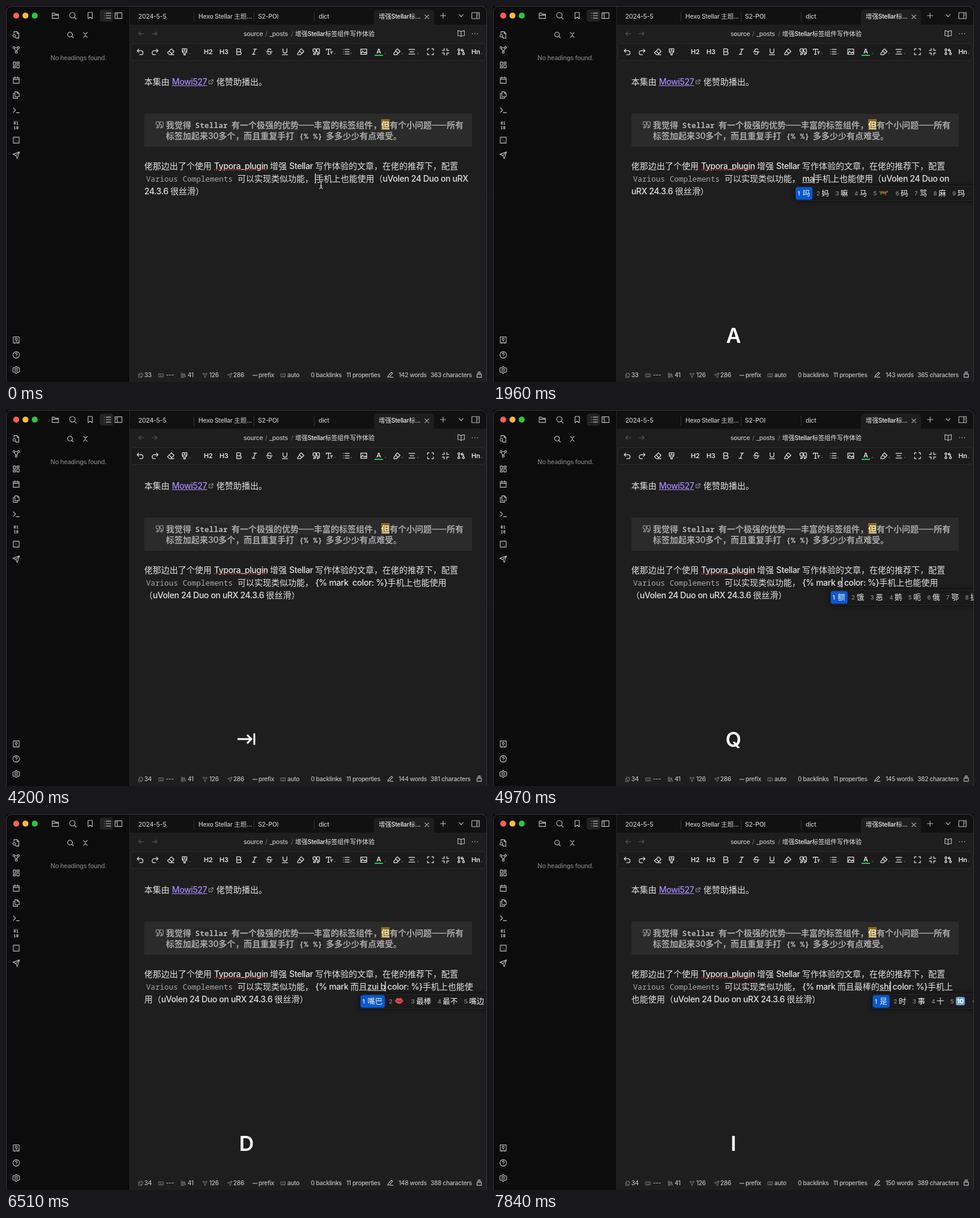
An HTML page with a canvas that plays this animation: 800 px wide and 625 px high, repeating every 8000 ms.

```html
<!DOCTYPE html>
<html lang="zh">
<head>
<meta charset="utf-8">
<style>
html, body { margin: 0; width: 100%; height: 100%; overflow: hidden; background: #0c0c0c; }
canvas { display: block; }
</style>
</head>
<body>
<canvas id="stage" width="800" height="625"></canvas>
<script>
const ctx = document.getElementById('stage').getContext('2d');
const LOOP = 8000, STEP = 70, BLINK = 455;
const LATIN = 'Inter, sans-serif', CJK = '"Noto Sans CJK SC", "Noto Sans CJK", sans-serif', MONO = '"Noto Sans Mono", monospace';
const TAIL = '手机上也能使用（uVolen 24 Duo on uRX 24.3.6 很丝滑）';
const OPEN = '{% mark ', CLOSE = ' color: %}';

// Each key press: overlay at `at`, text one step later; `cut` = tail characters left on the line.
const press = (at, key, before, comp, cut, cands, after = '') =>
  ({ at, key, before, comp, cut, cands: cands ? cands.split(' ') : null, after });
const tag = (at, key, text, comp, cut, cands) => press(at, key, OPEN + text, comp, cut, cands, CLOSE);
const ROWS = [
  press(-105, '', '', '', 29),
  press(1050, 'M', '', 'm', 29, '没 吗 们 每 买 名 么 面 美'),
  press(1540, 'A', '', 'ma', 25, '吗 妈 嘛 马 🐎 码 骂 麻 玛'),
  press(2030, 'R', '', 'ma r', 25, '骂人 买入 蚂蚁 马人 马儿 麻人'),
  press(2450, 'K', '', 'ma r k', 25, 'mark 骂人 买入 马儿 麻人'),
  press(3010, 'space', 'mark', '', 25),
  tag(3430, 'tab', '', '', 7),
  tag(4550, 'E', '', 'e', 7, '额 饿 恶 鹅 呃 俄 鄂 扼 峨'),
  tag(4970, 'Q', '', 'e q', 7, '而且 二期 恶气 二七 额前'),
  tag(5530, 'space', '而且', '', 7),
  tag(5740, 'Z', '而且', 'z', 7, '在 做 再 这 最 总 走 字 怎'),
  tag(5950, 'V', '而且', 'zui', 6, '最 嘴 罪 醉 👄 堆 咀 蕞'),
  tag(6230, 'B', '而且', 'zui b', 6, '嘴巴 👄 最棒 最不 嘴边 最笨'),
  tag(6510, 'D', '而且', 'zui b d', 5, '最棒的 最不对 最大 嘴巴的'),
  tag(6860, 'space', '而且最棒的', '', 5),
  tag(7350, 'U', '而且最棒的', 'sh', 4, '是 上 说 时 事 使 十 谁 水'),
  tag(7700, 'I', '而且最棒的', 'shi', 3, '是 时 事 十 🔟 使 式 市')
];

const ICONS = {
  folder: 'M3 5h6l3 3h9v12H3zM3 11h18',
  search: 'M11 3a8 8 0 1 0 .01 0zM17 17l5 5',
  bookmark: 'M6 3h12v18l-6-5-6 5z',
  list: 'M3 5h.1M3 12h.1M3 19h.1M8 5h13M8 12h13M8 19h13',
  panel: 'M2 4h20v16H2zM9 4v16M5 8h1M5 12h1',
  panelRight: 'M2 4h20v16H2zM15 4v16M18 8h1M18 12h1',
  close: 'M5 5l14 14M19 5L5 19',
  plus: 'M12 3v18M3 12h18',
  chevron: 'M5 8l7 8 7-8',
  back: 'M21 12H3m7-7-7 7 7 7',
  forward: 'M3 12h18m-7-7 7 7-7 7',
  book: 'M12 6v15M12 6c-2-2-6-3-10-3v15c4 0 8 0 10 3 2-3 6-3 10-3V3c-4 0-8 1-10 3z',
  dots: 'M4 12h.1M12 12h.1M20 12h.1',
  undo: 'M8 14L3 9l5-5M3 9h12a6 6 0 0 1 0 12h-4',
  redo: 'M16 14l5-5-5-5M21 9H9a6 6 0 0 0 0 12h4',
  eraser: 'M8 21l-6-6L14 3l8 8L12 21zM7 10l8 8M12 21h10',
  brush: 'M5 3h14v9a4 4 0 0 1-5 3v7h-4v-7a4 4 0 0 1-5-3zM5 10h14M12 3v4',
  pen: 'M9 10l-6 7v4h9l3-4M22 11l-6 6-8-8 6-6z',
  quote: 'M9 3H5a3 3 0 0 0-3 3v4a2 2 0 0 0 2 2h2c1 0 1 1 1 2 0 3-1 4-3 4v3c5 0 7-3 7-8V5a2 2 0 0 0-2-2z' +
    'M20 3h-4a3 3 0 0 0-3 3v4a2 2 0 0 0 2 2h2c1 0 1 1 1 2 0 3-1 4-3 4v3c5 0 7-3 7-8V5a2 2 0 0 0-2-2z',
  type: 'M2 7V4h14v3M9 4v16M6 20h6M15 12h7M18 12v7',
  image: 'M3 4h18v16H3zM3 17l6-6 5 5 3-3 4 4M8 8h.1',
  align: 'M3 5h18M6 12h12M3 19h18',
  bold: 'M6 3h8a4.5 4.5 0 0 1 0 9H6zM6 12h9a4.5 4.5 0 0 1 0 9H6z',
  italic: 'M10 4h9M5 20h9M15 4L9 20',
  strike: 'M17 6c-1-4-10-4-10 2 0 2 1 3 3 4M14 12c5 2 4 8-2 8-4 0-5-1-6-3M3 12h18',
  underline: 'M6 3v7a6 6 0 0 0 12 0V3M4 21h16',
  expand: 'M3 8V3h5M16 3h5v5M21 16v5h-5M8 21H3v-5',
  shrink: 'M8 2v6H2M16 2v6h6M16 22v-6h6M8 22v-6H2',
  branch: 'M5 3a3 3 0 1 0 .1 0zM5 9v6M5 15a3 3 0 1 0 .1 0zM19 15a3 3 0 1 0 .1 0zM19 15V7h-6m3-4-4 4 4 4',
  fileSearch: 'M5 8V2h10l5 5v15h-9M15 2v6h5M6 11a4 4 0 1 0 .1 0zM9 18l3 4',
  graph: 'M5 2a3 3 0 1 0 .1 0zM19 2a3 3 0 1 0 .1 0zM12 16a3 3 0 1 0 .1 0zM6 8l5 8M18 8l-5 8M8 5h8',
  grid: 'M3 3h7v9H3zM14 3h7v5h-7zM14 12h7v9h-7zM3 16h7v5H3z',
  calendar: 'M3 5h18v17H3zM3 10h18M8 2v5M16 2v5',
  files: 'M8 2h8l5 5v10H8zM16 2v5h5M8 7H3v15h13v-5',
  terminal: 'M3 5l7 7-7 7M12 20h10',
  dice: 'M3 3h18v18H3zM8 8h.1M12 12h.1M16 16h.1',
  send: 'M22 2L2 9l9 4 4 9zM22 2L11 13',
  vault: 'M3 3h18v18H3zM12 7a3 3 0 1 0 .1 0zM12 13v4M7 21v2M17 21v2',
  help: 'M12 2a10 10 0 1 0 .1 0zM9 9a3 3 0 1 1 4 3l-1 2M12 18h.1',
  gear: 'M12 8a4 4 0 1 0 .1 0zM10 2h4l1 3 3 1 3-1 2 4-2 3 2 3-2 4-3-1-3 1-1 3h-4l-1-3-3-1-3 1-2-4 2-3-2-3 2-4 3 1 3-1z',
  fold: 'M5 3l7 7 7-7M5 21l7-7 7 7',
  external: 'M14 3h7v7M21 3L10 14M18 14v7H3V6h7',
  library: 'M3 3v18h5V3zM8 6h5v15H8zM15 6l5 15 2-1-5-15z',
  keyboard: 'M2 5h20v14H2zM6 9h.1M10 9h.1M14 9h.1M18 9h.1M7 15h10',
  pencil: 'M3 21l2-6L17 3l4 4L9 19zM12 21h10',
  stack: 'M4 10h16v11H4zM6 6h12M8 2h8'
};
for (const name in ICONS) ICONS[name] = new Path2D(ICONS[name]);

function icon(name, x, y, size = 14, color = '#bcbcbc', width = 1.1) {
  const k = size / 24;
  ctx.save();
  ctx.translate(x - size / 2, y - size / 2);
  ctx.scale(k, k);
  ctx.lineWidth = width / k;
  ctx.lineCap = ctx.lineJoin = 'round';
  ctx.strokeStyle = color;
  ctx.stroke(ICONS[name]);
  ctx.restore();
}

function box(x, y, w, h, fill, radius = 0, stroke) {
  ctx.beginPath();
  ctx.roundRect(x, y, w, h, radius);
  if (fill) { ctx.fillStyle = fill; ctx.fill(); }
  if (stroke) { ctx.strokeStyle = stroke; ctx.lineWidth = 1; ctx.stroke(); }
}

function line(points, color, width = 1) {
  ctx.beginPath();
  points.forEach(p => ctx.lineTo(...p));
  ctx.strokeStyle = color;
  ctx.lineWidth = width;
  ctx.stroke();
}

function dot(x, y, r, color) {
  ctx.beginPath();
  ctx.arc(x, y, r, 0, 7);
  ctx.fillStyle = color;
  ctx.fill();
}

// Draws mixed text centred on y and returns the x where it ends.
function text(str, x, y, { size = 14, color = '#e0e0e0', weight = 450, mono = false } = {}) {
  const base = y + size * 0.365;
  ctx.fillStyle = color;
  for (const run of str.match(/—+|[\u2e80-\uffef]+|[^—\u2e80-\uffef]+/g) || []) {
    if (run[0] === '—') {
      const w = run.length * size * 0.89;
      ctx.fillRect(x, y, w, 1.4);
      x += w;
      continue;
    }
    const wide = run[0] > '\u2e7f';
    ctx.font = `${weight} ${size}px ${wide ? CJK : mono ? MONO : LATIN}`;
    ctx.letterSpacing = wide || mono ? '0px' : -0.028 * size + 'px';
    ctx.fillText(run, x, base);
    x += ctx.measureText(run).width;
  }
  return x;
}

function windowFrame() {
  box(0, 0, 800, 625, '#0c0c0c');
  box(205, 0, 595, 32, '#111');
  box(205, 31, 595, 594, '#1e1e1e');
  box(612, 6, 100, 26, '#1e1e1e', [6, 6, 0, 0]);
  line([[205.5, 0], [205.5, 625]], '#262626');
  ['#ff5f57', '#febc2e', '#28c840'].forEach((c, i) => dot(17 + i * 15.4, 16, 5, c));
  box(156, 6, 22, 20, '#222', 4);
  [['folder', 82], ['search', 111], ['bookmark', 140], ['list', 169], ['panel', 187]].forEach(([n, x]) => icon(n, x, 16));
  [312.5, 412.5, 512.5].forEach(x => line([[x, 10], [x, 26]], '#333'));
  [['2024-5-5', 220], ['Hexo Stellar 主题...', 320], ['S2-POI', 419], ['dict', 520]]
    .forEach(([s, x]) => text(s, x, 17.5, { size: 10.5, color: '#c0c0c0' }));
  text('增强Stellar标...', 620, 17.5, { size: 10.4, color: '#ececec', weight: 500 });
  icon('close', 700, 18, 11);
  icon('plus', 727, 16, 12);
  icon('chevron', 757, 16, 11);
  icon('panelRight', 781, 16, 15);
}

function sidebar() {
  ['fileSearch', 'graph', 'grid', 'calendar', 'files', 'terminal', null, 'dice', 'send']
    .forEach((n, i) => n && icon(n, 17, 48 + i * 25, 13));
  text('01', 12.5, 194, { size: 7, color: '#bcbcbc', weight: 600, mono: true });
  text('10', 12.5, 202, { size: 7, color: '#bcbcbc', weight: 600, mono: true });
  ['vault', 'help', 'gear'].forEach((n, i) => icon(n, 17, 555 + i * 25, 13));
  icon('search', 107, 48, 12);
  icon('fold', 132, 48, 11);
  text('No headings found.', 74, 86.5, { size: 10.5, color: '#7c7c7c' });
}

function toolbar() {
  icon('back', 225, 46, 11, '#555');
  icon('forward', 247, 46, 11, '#555');
  const small = { size: 10.4, color: '#c0c0c0' };
  text('source', 395, 46, small);
  text('_posts', 438, 46, small);
  [431, 474].forEach(x => text('/', x, 46, { size: 10.4, color: '#666' }));
  text('增强Stellar标签组件写作体验', 481, 46, { size: 10.3, color: '#e8e8e8', weight: 500 });
  icon('book', 757, 46, 13);
  icon('dots', 780, 46, 13, '#bcbcbc', 1.6);

  box(207.5, 62.5, 590, 28, '#1b1b1b', 4, '#2b2b2b');
  const white = '#e0e0e0';
  [['undo', 223], ['redo', 248], ['eraser', 274], ['brush', 297], ['bold', 387], ['italic', 413], ['strike', 438],
   ['underline', 464], ['pen', 490], ['quote', 516], ['type', 538], ['list', 566], ['image', 595], ['pen', 650],
   ['align', 675], ['expand', 706], ['shrink', 731], ['branch', 757]]
    .forEach(([n, x]) => icon(n, x, 76, 13, white, 1.25));
  [306, 547, 574, 631, 659, 685, 791].forEach(x => dot(x, 79, 0.8, '#888'));
  const bold = { size: 11, color: white, weight: 600 };
  [['H2', 329], ['H3', 355], ['Hn', 774]].forEach(([s, x]) => text(s, x, 76, bold));
  text('A', 616, 75, { size: 11, color: white, weight: 600 });
  line([[613, 82], [627, 82]], '#22c55e', 2);
}

function article() {
  text('本集由', 230, 126);
  const end = text('Mowi527', 276, 126, { color: '#a68af9' });
  line([[276, 132.5], [end, 132.5]], '#a68af9');
  icon('external', 341, 126, 9, '#999', 1);
  text('佬赞助播出。', 350, 126);

  box(230, 179, 545, 55, '#2b2b2b', 2);
  icon('quote', 255.5, 197.5, 14, '#a2a2a2', 1.1);
  box(312, 190, 60, 16, '#252525', 3);
  box(485, 208, 42, 16, '#252525', 3);
  box(624, 188, 14, 18, '#8a6a1c');
  const quote = { color: '#a8a8a8', weight: 600 }, code = { color: '#b4b4b4', weight: 700, size: 12.9, mono: true };
  text('我觉得', 266, 197.5, quote);
  text('Stellar', 314.5, 198, code);
  text('有一个极强的优势——丰富的标签组件，', 375, 197.5, quote);
  text('但', 624, 197.5, { color: '#f0e7cf', weight: 600 });
  text('有个小问题——所有', 638, 197.5, quote);
  text('标签加起来30多个，而且重复手打', 266, 216, quote);
  text('{% %}', 487.5, 216, code);
  text('多多少少有点难受。', 532, 216, quote);

  text('佬那边出了个使用', 230, 266);
  const stop = text('Typora_plugin', 346, 266);
  for (let x = 347; x < stop; x += 3.2) dot(x, 272.3, 1, '#e0342c');
  text('增强', 439, 266);
  text('Stellar', 471, 266);
  text('写作体验的文章，在佬的推荐下，配置', 514, 266);
  text('Various Complements', 233, 287, { size: 12.65, color: '#a8a8a8', weight: 400, mono: true });
  text('可以实现类似功能，', 385, 287);
}

function statusBar(inserted) {
  const words = 142 + (inserted.match(/[\u4e00-\u9fff]|[a-z]+/g) || []).length;
  const soft = { size: 10, color: '#bdbdbd' };
  [['files', 224], ['keyboard', 258], ['library', 295], ['graph', 331], ['send', 372], ['keyboard', 461]]
    .forEach(([n, x]) => icon(n, x, 614, 9, '#777', 0.9));
  line([[410, 614], [418, 614]], '#777', 2);
  [[inserted.includes('%') ? '34' : '33', 230], ['---', 266], ['41', 302], ['126', 338], ['286', 378], ['prefix', 420],
   ['auto', 468], ['0 backlinks', 507], ['11 properties', 566], [words + ' words', 653],
   [363 + inserted.length + ' characters', 706]].forEach(([s, x]) => text(s, x, 613.5, soft));
  icon('pencil', 639, 613, 11);
  icon('stack', 787, 613, 11);
}

const EMOJI = {
  '🐎'(x, y) {
    ctx.fillStyle = '#9a5b2c';
    ctx.beginPath();
    ctx.ellipse(x + 7, y - 1, 5, 2, 0.15, 0, 7);
    ctx.fill();
    line([[x, y - 3], [x + 3, y - 1], [x + 2, y + 3]], '#3f8a4a', 1.6);
    line([[x + 10, y - 1], [x + 13, y - 3], [x + 14, y - 1]], '#9a5b2c', 2);
    line([[x + 10, y], [x + 11, y + 4]], '#9a5b2c', 1.3);
  },
  '👄'(x, y) {
    ctx.beginPath();
    ctx.moveTo(x, y);
    ctx.quadraticCurveTo(x + 4, y - 8, x + 7, y - 4);
    ctx.quadraticCurveTo(x + 10, y - 8, x + 14, y);
    ctx.quadraticCurveTo(x + 7, y + 9, x, y);
    ctx.fillStyle = '#e0464f';
    ctx.fill();
    line([[x + 3, y], [x + 11, y]], '#7c2430', 1.3);
  },
  '🔟'(x, y) {
    box(x - 1, y - 7, 15, 14, '#6f9fd0', 3);
    text('10', x + 0.5, y, { size: 11, color: '#fff', weight: 700 });
  }
};

function candidates(list, x) {
  ctx.save();
  ctx.shadowColor = '#0009';
  ctx.shadowBlur = 7;
  box(x - 0.5, 299.5, 820 - x, 24, '#1c1c1c', 4, '#292929');
  ctx.restore();
  list.forEach((word, i) => {
    const w = EMOJI[word] ? 18 : /[a-z]/.test(word) ? 28 : word.length * 12.5;
    if (!i) box(x, 301, w + 15.5, 21, '#0a58d0', 4);
    text(String(i + 1), x + 3, 312, { size: 9.5, color: i ? '#8a8a8a' : '#fff' });
    if (EMOJI[word]) EMOJI[word](x + 13, 311);
    else text(word, x + 11.5, 311.5, { size: 12.5, color: '#f0f0f0', weight: 500 });
    x += w + 19;
  });
}

function completionMenu() {
  ctx.save();
  ctx.shadowColor = '#000a';
  ctx.shadowBlur = 8;
  box(515.5, 300.5, 100, 96, '#1b1b1b', 6, '#343434');
  ctx.restore();
  box(520, 304, 91, 43, '#303030', 4);
  [['mark => ...', '插入标记标签'], ['md => ...', '插入md标签']].forEach(([title, note], i) => {
    const y = 317 + i * 43.5;
    icon('library', 533.5, y + 1, 12, '#999', 1);
    text(title, 544, y);
    text(note, 544, y + 19, { size: 8.8, color: '#b0b0b0' });
  });
}

function keyOverlay(key) {
  const white = '#fff';
  if (key === 'space') {
    line([[389, 555], [389, 562], [411, 562], [411, 555]], white, 2);
  } else if (key === 'tab') {
    line([[385, 547], [408, 547]], white, 3);
    line([[401, 540], [408, 547], [401, 554]], white, 3);
    line([[413, 537.5], [413, 556.5]], white, 3);
  } else if (key) {
    ctx.font = `600 34px ${LATIN}`;
    ctx.letterSpacing = '0px';
    ctx.fillStyle = white;
    ctx.fillText(key, 400 - ctx.measureText(key).width / 2, 559.8);
  }
}

function pointer(x, y) {
  for (const [color, width] of [['#111', 3], ['#ddd', 1.2]]) {
    line([[x, y - 5], [x, y + 5]], color, width);
    for (const s of [-1, 1])
      line([[x - 3, y + 6.5 * s], [x, y + 5 * s], [x + 3, y + 6.5 * s]], color, width);
  }
  line([[x - 2, y + 2], [x + 2, y + 2]], '#ddd');
}

function draw(t) {
  const key = ROWS.findLast(r => r.at <= t);
  const row = ROWS.findLast(r => r.at + STEP <= t);
  windowFrame();
  sidebar();
  toolbar();
  article();
  statusBar(row.before + row.comp + row.after);

  const start = text(row.before, 514.5, 287);
  const caret = text(row.comp, start, 287);
  if (row.comp) line([[start, 293.5], [caret, 293.5]], '#ddd');
  text(row.after + TAIL.slice(0, row.cut), caret, 287);
  text(TAIL.slice(row.cut), 230, 308);
  const visible = Math.floor((t - row.at - STEP) / BLINK) % 2 === 0;
  if (visible) line([[caret, 278], [caret, 295]], '#f2f2f2', 1.2);
  if (t < 1050) pointer(524, 297);

  if (row.cands && (key === row || key.key !== 'space')) candidates(row.cands, start - 11);
  if (row.before === 'mark') completionMenu();
  keyOverlay(key.key);
  box(0.5, 0.5, 799, 640, null, 9, '#383838');
}

function tick() {
  const t = performance.now() % LOOP;
  draw(Math.floor(t / STEP) * STEP);
  requestAnimationFrame(tick);
}
tick();
</script>
</body>
</html>
```
